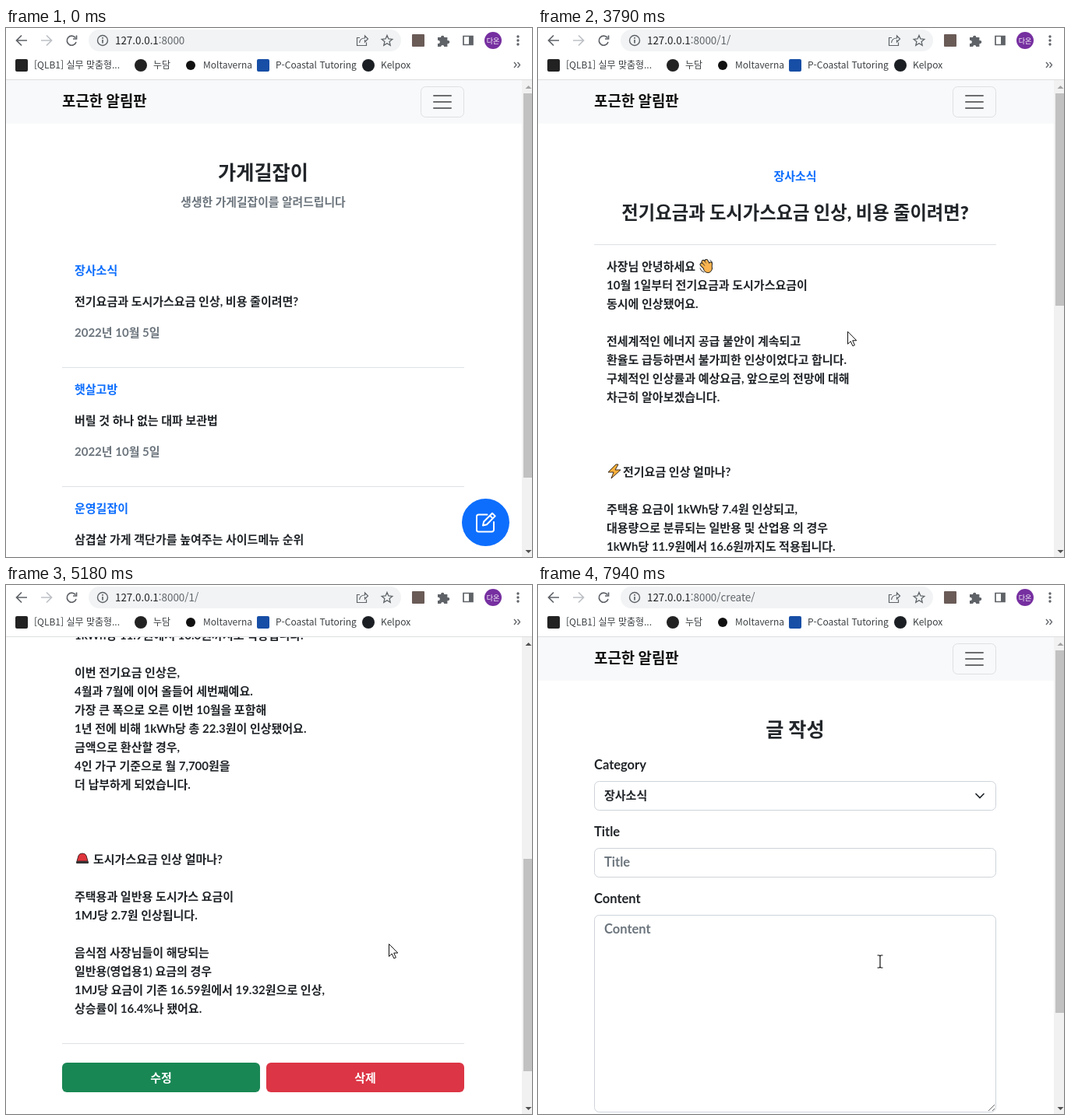
Recreate the animation shown at these times as an HTML page. Size 675 by 680 pixels, loop 8000 ms.

```html
<!DOCTYPE html>
<html lang="ko">
<head>
<meta charset="utf-8">
<title>포근한 알림판</title>
<style>
html, body { margin: 0; width: 100%; height: 100%; overflow: hidden; background: #fff; }
svg { display: block; }
text { font-family: Lato, "Noto Sans CJK KR", "Noto Sans CJK", sans-serif; white-space: pre; }
.frame text { font-family: "Noto Sans CJK KR", "Noto Sans CJK", sans-serif; }
.icon { fill: none; stroke: #5f6368; stroke-width: 1.7; }
</style>
</head>
<body>
<script>
const LOOP = 8000;
const INK = '#212529', MUTED = '#6c757d', BLUE = '#0d6efd', GREY = '#5f6368';

// ---- drawing helpers: text y is the visual middle of the line ----
const text = (x, y, s, fill = INK, size = 15, weight = 700, anchor = 'start') =>
  `<text x="${x}" y="${y + size * 0.39}" font-size="${size}" font-weight="${weight}" fill="${fill}" text-anchor="${anchor}">${s}</text>`;
const centred = (y, s, fill, size, weight = 700, x = 330) => text(x, y, s, fill, size, weight, 'middle');
const heading = (y, s, size = 25.2) => centred(y, s, INK, size, 900);
const latin = (y, s, fill, x = 72) => text(x, y, s, fill, 16.5);
const rect = (x, y, w, h, fill, attrs = '') =>
  `<rect x="${x}" y="${y}" width="${w}" height="${h}" fill="${fill}" ${attrs}/>`;
const circle = (x, y, r, fill, attrs = '') => `<circle cx="${x}" cy="${y}" r="${r}" fill="${fill}" ${attrs}/>`;
const path = (d, attrs = '') => `<path d="${d}" ${attrs}/>`;
const line = y => rect(72, y, 516, 1, '#dee2e6');

// ---- browser frame ----
const label = (x, s) => text(x, 47.7, s, '#3c4043', 12, 400);
const chrome = () =>
  rect(0, 0, 675, 67, '#fff') + rect(0, 66, 675, 1, '#dcdee1') +
  rect(106, 2, 401, 28, '#f1f3f4', 'rx="14"') +
  `<g class="icon">` +
  path('M27 16H14M20 9.5l-6.5 6.5 6.5 6.5') +
  path('M45 16H58M52 9.5l6.5 6.5-6.5 6.5', 'style="stroke:#bdc1c6"') +
  path('M89 12.5A6 6 0 1 0 90 18M90.5 9.5v4.5h-4.5', 'id="reload"') +
  path('M79 11l10 10M89 11l-10 10', 'id="stop"') +
  circle(124, 16, 6.5, 'none', 'stroke-width="1.4"') + path('M124 15v4.5M124 12v1.7') +
  path('M454 12.5h-3.5v10h12v-4M453.5 19c.5-4 3-6 7-6v-3l4 4-4 4v-2.7', 'style="stroke-width:1.2"') +
  path('M489 9.5l1.9 4.5 4.9.4-3.7 3.2 1.1 4.8-4.2-2.6-4.2 2.6 1.1-4.8-3.7-3.2 4.9-.4z', 'style="stroke-width:1.3"') +
  path('M587 10.5h12v11h-12z') + `</g>` +
  rect(594, 10, 5, 12, GREY) +
  rect(521, 8, 16, 16, '#6a5b57', 'rx="1"') +
  path('M554 12h4a2.2 2.2 0 1 1 4.4 0h4v4a2.2 2.2 0 1 1 0 4.2v3.8h-4.2a2 2 0 1 0-4 0h-4.2v-4a2.2 2.2 0 1 0 0-4.2z', `fill="${GREY}"`) +
  circle(625, 16, 11, '#762fa0') + text(625, 16, '다온', '#fff', 9, 500, 'middle') +
  [11, 16, 21].map(y => circle(657, y, 1.7, GREY)).join('') +
  `<text x="140" y="21" font-size="13.4" fill="#202124">127.0.0.1<tspan id="url" fill="${GREY}"></tspan></text>` +
  rect(12, 40, 16, 16, '#222', 'rx="2"') + label(36, '[QLB1] 실무 맞춤형...') +
  circle(173, 48, 8, '#222') + label(189, '누담') +
  circle(237, 48, 6, '#111') + label(253, 'Moltaverna') +
  rect(322, 40, 16, 16, '#174ea6', 'rx="2"') + label(346, 'P-Coastal Tutoring') +
  circle(465, 48, 8, '#1b1f23') + label(481, 'Kelpox') +
  path('M652 44l3 3.5-3 3.5M656.5 44l3 3.5-3 3.5', 'class="icon" style="stroke-width:1.3"');

const scrollbar = () =>
  rect(662, 67, 13, 613, '#f1f1f1') + rect(664, 84, 11, 494, '#c1c1c1', 'id="thumb"') +
  path('M666.5 78l4-4 4 4z', 'id="up"') + path('M666.5 671l4 4 4-4z', 'id="down"');

// ---- pages ----
const navbar = (attrs = '') =>
  rect(0, 67, 662, 56, '#f8f9fa', attrs) + text(72, 94, '포근한 알림판', '#111', 18.9, 900) +
  rect(532.5, 75.5, 55, 39, 'none', 'rx="6" stroke="#dfe0e1"') +
  path('M549 87h22M549 95h22M549 103h22', 'stroke="#6b6d6f" stroke-width="2" stroke-linecap="round"');

const posts = [
  ['장사소식', '전기요금과 도시가스요금 인상, 비용 줄이려면?'],
  ['햇살고방', '버릴 것 하나 없는 대파 보관법'],
  ['운영길잡이', '삼겹살 가게 객단가를 높여주는 사이드메뉴 순위'],
];
const post = ([category, title], i) => {
  const y = 284 + 153 * i;
  return rect(72, y, 516, 152, '#f8f8f9', 'class="post"') + text(88, y + 27, category, BLUE) +
    text(88, y + 67, title) + text(88, y + 107, '2022년 10월 5일', MUTED) + line(y + 152);
};
const home = () =>
  navbar('id="nav"') +
  rect(530, 73, 60, 44, 'none', 'id="ring" rx="8" stroke="#707172" stroke-width="4"') +
  `<g clip-path="url(#menuClip)">` +
  ['django-admin', 'static files', 'django-bootstrap5'].map((s, i) => latin(134 + 40 * i, s, '#6f7173')).join('') +
  `</g><g id="content">` + heading(185, '가게길잡이') +
  centred(223, '생생한 가게길잡이를 알려드립니다', MUTED, 14.8) + posts.map(post).join('') + `</g>` +
  circle(615.5, 635.5, 32.5, 'none', 'id="fabRing" stroke="#86b6fe" stroke-width="4"') +
  circle(615.5, 635.5, 30.5, BLUE, 'id="fab"') +
  path('M15 3.5H4a2.5 2.5 0 0 0-2.5 2.5v17a2.5 2.5 0 0 0 2.5 2.5h17a2.5 2.5 0 0 0 2.5-2.5V13M9.5 17.5l1.2-5L21.5 1.7l3.7 3.7L14.5 16.2zM18.5 4.7l3.7 3.7',
    'transform="translate(602.5 622)" fill="none" stroke="#fff" stroke-width="2" stroke-linejoin="round" stroke-linecap="round"');

const article = `사장님 안녕하세요
10월 1일부터 전기요금과 도시가스요금이
동시에 인상됐어요.

전세계적인 에너지 공급 불안이 계속되고
환율도 급등하면서 불가피한 인상이었다고 합니다.
구체적인 인상률과 예상요금, 앞으로의 전망에 대해
차근히 알아보겠습니다.



전기요금 인상 얼마나?

주택용 요금이 1kWh당 7.4원 인상되고,
대용량으로 분류되는 일반용 및 산업용 의 경우
1kWh당 11.9원에서 16.6원까지도 적용됩니다.

이번 전기요금 인상은,
4월과 7월에 이어 올들어 세번째예요.
가장 큰 폭으로 오른 이번 10월을 포함해
1년 전에 비해 1kWh당 총 22.3원이 인상됐어요.
금액으로 환산할 경우,
4인 가구 기준으로 월 7,700원을
더 납부하게 되었습니다.



도시가스요금 인상 얼마나?

주택용과 일반용 도시가스 요금이
1MJ당 2.7원 인상됩니다.

음식점 사장님들이 해당되는
일반용(영업용1) 요금의 경우
1MJ당 요금이 기존 16.59원에서 19.32원으로 인상,
상승률이 16.4%나 됐어요.`.split('\n');
const indent = { 11: 21, 27: 24 };
const fingers = 'M4 7l6 6M6 3.5l6 7M10 2.5l4 7M15 11l.5-5M9 12l4 3';
const emoji =
  `<g transform="translate(206 297)" stroke-linecap="round" fill="none">` +
  path(fingers, 'stroke="#222" stroke-width="5"') + circle(12, 12, 5.5, '#fbb450', 'stroke="#222"') +
  path(fingers, 'stroke="#fbb450" stroke-width="3"') + path('M2 12q1 4 5 5M15 1.5q2 1 2.5 3', 'stroke="#333"') + `</g>` +
  path('M100 561l-10 10h7l-3 8 12-11h-7l4-7z', 'fill="#fbb03b" stroke="#3a2a1a" stroke-linejoin="round"') +
  path('M91 957l2-7q1-3 5-3t5 3l2 7z', 'fill="#e0343c" stroke="#4a2426"') + rect(90, 957, 16, 3, '#333', 'rx="1"');
const button = (x, y, w, fill, s, attrs = '') =>
  rect(x, y, w, 38, fill, `rx="6" ${attrs}`) + centred(y + 19, s, '#fff', 15, 900, x + w / 2);
const detail = () =>
  navbar() + centred(190, '장사소식', BLUE, 15) + heading(236.5, posts[0][1], 23.3) + line(278) +
  article.map((s, i) => text(88 + (indent[i] || 0), 306 + 24 * i, s)).join('') + emoji + line(1191) +
  button(72, 1216, 254, '#198754', '수정') + button(334, 1216, 254, '#dc3545', '삭제') +
  rect(70, 1284, 520, 42, 'none', 'id="backRing" rx="8" stroke="#b5babe" stroke-width="4"') +
  button(72, 1286, 516, MUTED, '목록으로', 'id="back"');

const field = (y, h) => rect(72.5, y + .5, 515, h - 1, '#fff', 'rx="6" stroke="#ced4da"');
const create = () =>
  navbar() + heading(185, '글 작성') +
  latin(231, 'Category') + field(252, 38) + text(85, 270, '장사소식') +
  path('M562 268.5l5 5 5-5', `fill="none" stroke="${INK}" stroke-width="1.7" stroke-linecap="round"`) +
  latin(317, 'Title') + field(338, 38) + latin(356, 'Title', MUTED, 85) +
  latin(403, 'Content') + field(424, 254) + latin(442, 'Content', MUTED, 85) +
  path('M578 676l8-8M583 676l3-3', 'stroke="#666"');

// ---- pointers, hot spot at 0,0 ----
const pointers = {
  arrow: path('M0 0v16l3.7-3.5 2.7 6 2.5-1.1-2.7-5.9h5.1z', 'fill="#fff" stroke="#111"'),
  hand: path('M-2 1.5q1.8-2.5 3.6 0v7q1.6-1.2 3.2.5 1.8-1 3 .8 2.4-.6 2.7 1.7v4q0 3-2 5v3h-8.5v-2.5l-6-7.5q-1.5-3 1.5-2.5l2.5 2.5z',
    'fill="#fff" stroke="#111" stroke-width="1.2"') + path('M1.6 8.5v4M4.8 9v4M7.8 10v3', 'stroke="#111"'),
  beam: path('M-3.5-8H-1L0-7 1-8H3.5M-3.5 8H-1L0 7 1 8H3.5M0-7V7', 'fill="none" stroke="#111" stroke-width="1.2"'),
};

document.body.innerHTML = `<svg width="675" height="680" viewBox="0 0 675 680">
<clipPath id="view"><rect y="67" width="662" height="613"/></clipPath>
<clipPath id="menuClip"><rect id="menuBox" y="115" width="662" height="0"/></clipPath>
<g clip-path="url(#view)"><g id="home">${home()}</g><g id="detail">${detail()}</g><g id="create">${create()}</g></g>
${scrollbar()}<g class="frame">${chrome()}</g>
<g id="pointer">${Object.entries(pointers).map(([k, s]) => `<g id="${k}">${s}</g>`).join('')}</g></svg>`;

// ---- timing ----
const $ = id => document.getElementById(id);
const set = (id, attrs) => { for (const k in attrs) $(id).setAttribute(k, attrs[k]); };
const show = (id, on) => { $(id).style.display = on ? '' : 'none'; };
const ramp = (t, start, length) => Math.min(1, Math.max(0, (t - start) / length));
const smooth = p => p * p * (3 - 2 * p);

// CSS "ease": cubic-bezier(.25, .1, .25, 1)
function ease(x) {
  let lo = 0, hi = 1;
  for (let i = 0; i < 20; i++) {
    const m = (lo + hi) / 2, n = 1 - m;
    if (.75 * n * n * m + .75 * n * m * m + m ** 3 < x) lo = m; else hi = m;
  }
  return .3 * lo * (1 - lo) ** 2 + 3 * lo * lo * (1 - lo) + lo ** 3;
}

// keys: [time, ...values]
function track(keys, t, curve) {
  const i = keys.findIndex(k => k[0] > t);
  if (i === 0) return keys[0].slice(1);
  if (i < 0) return keys[keys.length - 1].slice(1);
  const a = keys[i - 1], b = keys[i], p = curve(ramp(t, a[0], b[0] - a[0]));
  return a.slice(1).map((v, j) => v + (b[j + 1] - v) * p);
}

const mouse = [
  [120, 652, 700], [850, 548, 98], [1360, 547, 97], [1540, 550, 85], [1760, 550, 85], [1820, 542, 85],
  [2000, 545, 88], [2180, 545, 88], [2720, 367, 370], [3620, 367, 370], [4150, 491.5, 452.5], [4400, 491.5, 452.5],
  [4600, 491.5, 461.5], [5430, 491.5, 461.5], [5740, 389, 615], [6300, 389, 615], [6950, 613, 630],
  [7660, 613, 630], [7940, 439, 484],
];
const wheel = [[4200, 0], [4350, 150], [4420, 150], [4920, 600], [5180, 602], [5250, 602], [5430, 690]];
const loads = [[2940, 3250], [5990, 6230], [7100, 7660]];
const inside = (x, y, l, t, w, h) => x >= l && x < l + w && y >= t && y < t + h;

function render(t) {
  const page = t < 3250 ? 'home' : t < 6230 ? 'detail' : t < 7660 ? 'home' : 'create';
  for (const p of ['home', 'detail', 'create']) show(p, p === page);
  $('url').textContent = ':8000' + { home: '', detail: '/1/', create: '/create/' }[page];
  const loading = loads.some(([a, b]) => t >= a && t < b);
  show('reload', !loading);
  show('stop', loading);

  const menu = Math.round(128 * (ease(ramp(t, 1045, 350)) - ease(ramp(t, 1990, 350))));
  set('nav', { height: 56 + menu });
  set('menuBox', { height: menu });
  set('content', { transform: `translate(0 ${menu})` });
  set('ring', { opacity: t < 3250 ? ramp(t, 950, 150) : 0 });

  const scroll = page === 'detail' ? Math.round(track(wheel, t, p => p)[0]) : 0;
  const pageHeight = { home: 718 + menu, detail: 1302, create: 762 }[page];
  set('detail', { transform: `translate(0 ${-scroll})` });
  set('thumb', { y: Math.round(84 + 579 * scroll / pageHeight), height: Math.round(579 * 613 / pageHeight) });
  set('up', { fill: scroll > 0 ? '#505050' : '#a3a3a3' });
  set('down', { fill: scroll >= 689 ? '#a3a3a3' : '#505050' });

  const [x, y] = track(mouse, t, smooth);
  const onHome = page === 'home', onDetail = page === 'detail';
  const overFab = onHome && Math.hypot(x - 615.5, y - 635.5) < 30.5;
  let hot = overFab || onHome && inside(x, y, 532, 75, 56, 40);
  document.querySelectorAll('.post').forEach((el, i) => {
    const over = onHome && !overFab && inside(x, y, 72, 284 + 153 * i + menu, 516, 152);
    el.style.opacity = +over;
    hot ||= over;
  });
  set('fab', { fill: overFab ? '#0b5ed7' : BLUE });
  set('fabRing', { opacity: ramp(t, 7080, 150) });
  set('backRing', { opacity: ramp(t, 5960, 100) });
  set('back', { fill: t > 5860 ? '#5c636a' : MUTED });
  hot ||= onDetail && (inside(x, y + scroll, 72, 1286, 516, 38) || inside(x, y + scroll, 72, 1216, 516, 38));
  const typing = page === 'create' && (inside(x, y, 72, 338, 516, 38) || inside(x, y, 72, 424, 516, 254));
  const kind = hot ? 'hand' : typing ? 'beam' : 'arrow';
  for (const k in pointers) show(k, k === kind);
  set('pointer', { transform: `translate(${x} ${y})` });
}

function tick() {
  render(performance.now() % LOOP);
  requestAnimationFrame(tick);
}
tick();
</script>
</body>
</html>
```
